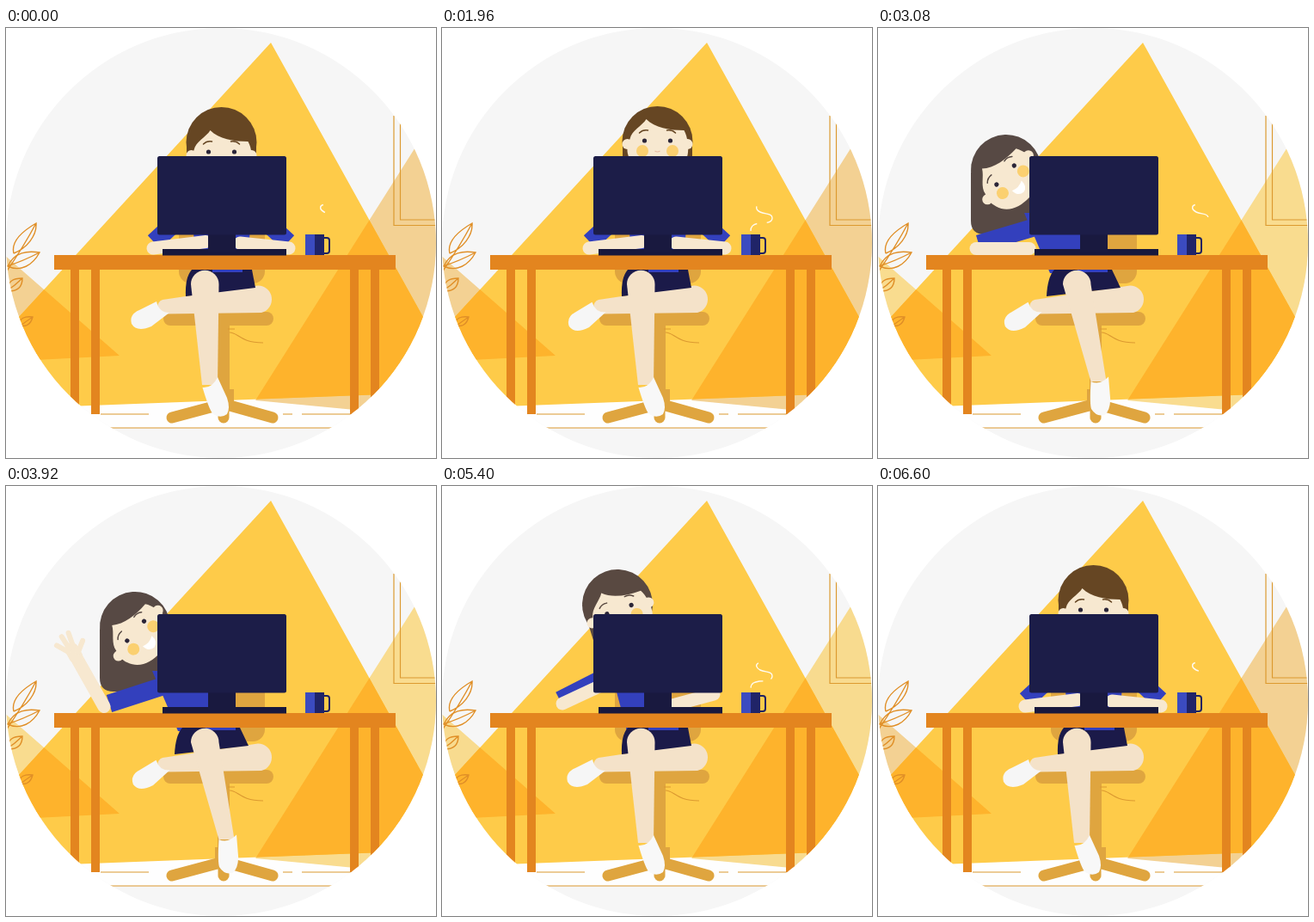
An HTML page for the animation above (6640 ms loop, 500x500 px).

```html
<!DOCTYPE html>
<html lang="en">
<head>
<meta charset="utf-8">
<title>At the desk</title>
<style>
  html, body { margin: 0; width: 100%; height: 100%; overflow: hidden; background: #fff; }
  svg { display: block; width: 100vw; height: 100vh; }
  .line { fill: none; stroke: #dc9a30; stroke-width: 1.2; }
  .plant { fill: none; stroke: #e08f27; stroke-width: 1.4; }
  .arm { fill: none; stroke: #f7e8d0; stroke-width: 15; stroke-linecap: round; }
  .sleeve { fill: none; stroke: #3340bd; stroke-width: 21; }
  .skin { fill: #f4e2c9; }
  .steam { fill: none; stroke: #fffaf0; stroke-width: 1.4; }
</style>
</head>
<body>
<svg viewBox="0 0 500 500">
  <defs>
    <clipPath id="disc"><circle cx="250" cy="250" r="250"/></clipPath>
    <path id="peak" d="M308 17L545 444L440 426L85 439.500L-20 443V374Z"/>
    <clipPath id="inPeak"><use href="#peak"/></clipPath>
    <path id="sideShapes" d="M520 69L290 433L520 455ZM-5 261L132 381L-60 391Z"/>
  </defs>
  <g clip-path="url(#disc)">
    <rect width="500" height="500" fill="#f6f6f6"/>
    <rect y="425" width="500" height="40" fill="#fefefe"/>
    <use id="faint" href="#sideShapes"/>
    <use href="#peak" fill="#fecb49"/>
    <use href="#sideShapes" fill="#feb32c" clip-path="url(#inPeak)"/>

    <g class="line">
      <path d="M451 102V229.500H500M458.500 109V223H500"/>
      <path d="M100 465H400M110 449H166M322 449H333M344 449H403"/>
    </g>
    <g class="plant">
      <path d="M0 284Q20 255 35 227M9 262C6 250 16 238 35 227C36 242 24 256 9 262"/>
      <path d="M1 277Q20 271 39 261M2 277C10 260 25 259 39 261C31 276 17 284 2 277"/>
      <path d="M0 306Q10 300 19 291M3 306C1 294 9 291 19 291C19 300 14 306 3 306"/>
      <path d="M12 350Q22 342 31 336M16 346C15 337 22 335 31 336C29 344 24 348 16 346"/>
    </g>

    <g fill="#dfa53f">
      <rect x="201" y="222" width="100" height="75" rx="14"/>
      <rect x="183" y="330" width="128" height="16" rx="8"/>
      <path d="M246 346H260V420H265V440H243V420H246Z"/>
      <path d="M193 453L253 437L310 453M253 437V453" fill="none" stroke="#dfa53f" stroke-width="13" stroke-linecap="round"/>
    </g>
    <path d="M260 354C270 354 272 366 299 366M258 350H266" class="line"/>

    <path id="backHair"/>
    <path id="torso" fill="#3340bd"/>
    <path id="sleeveR" class="sleeve"/>
    <path id="armR" class="arm"/>
    <g id="head">
      <circle id="cap" r="41"/>
      <g id="face">
        <g fill="#f7e8d0">
          <circle cx="-35" cy="4" r="6"/>
          <circle cx="35" cy="4" r="6"/>
          <path d="M-13-25C-3-15 14-12 31-12C35-5 37 9 35 17C30 32 16 38 0 38C-16 38-30 32-34 17C-36 10-35 4-32-2C-30-12-18-17-13-25Z"/>
        </g>
        <g fill="#fbd070">
          <circle cx="-17.5" cy="12" r="7"/>
          <circle cx="17.5" cy="12" r="7"/>
        </g>
        <g fill="#2b2538">
          <circle cx="-15" r="2.6"/>
          <circle cx="15" r="2.6"/>
        </g>
        <path id="brows" d="M-21-9Q-17-13-11-12M11-12Q17-13 21-9" fill="none" stroke-width="1.5" stroke-linecap="round"/>
        <path id="calm" d="M-3 12Q0 14 3 12" fill="none" stroke="#e8b9a0" stroke-width="1.2"/>
        <path id="smile" d="M-8 18Q0 22 8 18Q8 28 0 29Q-8 28-8 18Z" fill="#fff"/>
      </g>
    </g>
    <path id="sleeveL" class="sleeve"/>
    <path id="armL" class="arm"/>
    <g id="hand" fill="none" stroke="#f7e8d0" stroke-width="6" stroke-linecap="round">
      <path d="M0-4V-14" stroke-width="16"/>
      <path d="M-5-14L-13-27M-2-16L-3-33M3-16L6-33M5-8L16-17"/>
    </g>

    <g>
      <path class="skin" d="M293 299.5A16 16 0 0 1 297 331L184 332.5A8.5 8.5 0 0 1 182 316Z"/>
      <path id="skirt" fill="#1b1a49"/>
      <path id="shirtHem" fill="none" stroke="#3340bd" stroke-width="3"/>
      <path id="shin" class="skin"/>
      <path id="shoeL" fill="#f6f6f6" d="M175 318Q178 331 190 331L169 347Q152 354 146 344Q143 333 155 328Z"/>
      <path id="shoeR" fill="#f8f8f8" d="M-8.500 3Q3 4 9-9L20 15Q24 27 20 34Q12 40 3 33Q-1 28-8.500 3Z"/>
    </g>

    <path d="M56 264H453V281H434V449H424V281H410V449H400V281H109V449H99V281H85V449H75V281H56Z" fill="#e3851f"/>
    <rect x="182" y="257" width="144" height="7.500" fill="#18183d"/>
    <rect x="235" y="239" width="32" height="22" fill="#19193f"/>
    <rect x="176" y="149" width="150" height="91.500" rx="2.500" fill="#1c1d48"/>

    <rect x="367" y="244" width="9" height="18" rx="3" fill="none" stroke="#1e2261" stroke-width="2"/>
    <rect x="348" y="240" width="22" height="24" fill="#3b4bc0"/>
    <rect x="359" y="240" width="11" height="24" fill="#202468"/>
    <path id="steam1" class="steam"/>
    <path id="steam2" class="steam"/>
  </g>
</svg>
<script>
const LOOP = 6640, PUFF = LOOP / 2;
const el = Object.fromEntries([...document.querySelectorAll('[id]')].map(e => [e.id, e]));
const set = (id, name, value) => el[id].setAttribute(name, value);
const mix = (a, b, k) => a + (b - a) * k;
const smooth = k => k * k * (3 - 2 * k);
const line = (...points) => 'M' + points.join('L');
const tint = (a, b, k) => `rgb(${a.map((v, i) => Math.round(mix(v, b[i], k)))})`;

// head: x, y, turn; face: offset; hair and torso: corners; arms: shoulder, elbow (, hand)
const front = {
  head: [250.5, 133, 0], face: [0, 11],
  hair: [210, 128, 210, 200, 291, 200, 291, 128],
  torso: [215, 190, 286, 190, 281, 285, 221, 285],
  left: [200, 223, 172, 249], right: [300, 223, 328, 249, 272, 250],
  arm: [171, 256, -7], lean: [0]
};
const peek = { ...front, head: [250.5, 132, 0], face: [0, -1] };
const halfway = {
  head: [204, 138, -20], face: [0, 6],
  hair: [163, 138, 179, 205, 256, 200, 239, 125],
  torso: [190, 190, 250, 190, 275, 285, 215, 285],
  left: [190, 222, 137, 249], right: [280, 222, 315, 237, 264, 256],
  arm: [140, 253, -25], lean: [0.3]
};
const leaning = {
  head: [149, 165, -47], face: [-5, 3.5],
  hair: [108, 168, 108, 240, 185, 240, 184, 150],
  torso: [170, 215, 225, 215, 268, 285, 200, 285],
  left: [188, 230, 117, 251], right: [250, 215, 285, 228, 255, 230],
  arm: [114, 256.5, 0], lean: [1]
};
const waving = {
  ...leaning, head: [150, 164, -49], face: [-3, 3.5],
  hair: [109, 167, 109, 239, 185, 240, 184, 150], left: [188, 231, 120, 253]
};

const poses = [
  [0, front], [1450, front], [1800, peek], [2220, peek], [2520, halfway],
  [2900, leaning], [3200, leaning], [3600, waving], [4900, waving],
  [5400, halfway], [5780, front], [LOOP, front]
];
const wave = [
  [0, 0], [3180, 0], [3500, 1], [4880, 1], [5120, 0], [LOOP, 0]
];
const tap = [
  [0, 0], [1100, 1], [4200, 1], [5400, 0], [LOOP, 0]
];

// start and end of each puff along its path
const puff1 = [[950, 0, 0], [1200, 0, 26], [1480, 3, 48], [2080, 29, 61], [2500, 64, 64]];
const puff2 = [[1450, 0, 0], [1980, 0, 13], [2400, 5, 40], [3080, 34, 62], [3300, 48, 62], [3700, 64, 64]];

function span(keys, t) {
  if (t <= keys[0][0]) return [keys[0], keys[0], 0];
  const i = keys.findIndex(key => key[0] > t);
  if (i < 0) return [keys.at(-1), keys.at(-1), 0];
  const a = keys[i - 1], b = keys[i];
  return [a, b, (t - a[0]) / (b[0] - a[0])];
}

function track(keys, t) {
  const [a, b, k] = span(keys, t);
  return mix(a[1], b[1], smooth(k));
}

function poseAt(t) {
  const [a, b, k] = span(poses, t);
  const pose = {};
  for (const part in front)
    pose[part] = a[1][part].map((v, i) => mix(v, b[1][part][i], smooth(k)));
  return pose;
}

function drawSteam(id, keys, t) {
  const [a, b, k] = span(keys, t);
  const from = mix(a[1], b[1], k), to = mix(a[2], b[2], k);
  set(id, 'stroke-dasharray', `0 ${from} ${to - from} 200`);
}

function drawHead(p) {
  const [x, y, turn] = p.head, h = p.hair, lean = p.lean[0];
  const brown = tint([102, 70, 35], [87, 73, 68], Math.min(1, lean * 3));
  set('head', 'transform', `translate(${x} ${y}) rotate(${turn})`);
  set('face', 'transform', `translate(${p.face})`);
  set('cap', 'fill', brown);
  set('brows', 'stroke', brown);
  set('backHair', 'fill', brown);
  set('backHair', 'd', `M${h[0]} ${h[1]}L${h[2]} ${h[3] - 16}Q${h[2]} ${h[3]} ${h[2] + 16} ${h[3]}L${h[4]} ${h[5]}L${h[6]} ${h[7]}Z`);
  set('smile', 'opacity', lean);
  set('calm', 'opacity', 1 - lean);
}

function drawArms(p, t) {
  const l = p.left, r = p.right, up = track(wave, t);
  const sway = 9 * Math.sin((t - 4800) / 640 * 2 * Math.PI);
  const angle = mix(p.arm[2], -113 + sway, up), rad = angle * Math.PI / 180;
  const [ex, ey] = p.arm;
  const hx = ex + 62 * Math.cos(rad), hy = ey + 62 * Math.sin(rad);
  set('sleeveL', 'd', line(l.slice(0, 2), l.slice(2)));
  set('armL', 'd', line([ex, ey], [hx, hy]));
  set('sleeveR', 'd', line(r.slice(0, 2), r.slice(2, 4)));
  set('armR', 'd', line([r[2] + 1, r[3] + 7 * (1 - p.lean[0])], r.slice(4)));
  set('hand', 'transform', `translate(${hx} ${hy}) rotate(${angle + 90})`);
  set('hand', 'opacity', Math.min(1, up * 3));
  const o = p.torso;
  set('torso', 'd', line(o.slice(0, 2), o.slice(2, 4), o.slice(4, 6), o.slice(6)) + 'Z');
}

function drawLegs(lean, t) {
  const s = Math.max(0, (lean - 0.3) / 0.7);
  const ax = mix(237, 256.5, s), ay = mix(415, 411, s);
  const move = (x, y, dx) => [x + dx * s, y];
  const hip = [move(209, 312, -13), move(208, 290, -11), move(216, 281, -11)];
  set('skirt', 'd', line(move(286, 281, -14), move(290, 302, -8), hip[0]) + `Q${hip[1]} ${hip[2]}Z`);
  set('shirtHem', 'd', line(move(240, 282.5, -8), move(275, 282.5, -8)));
  set('shin', 'd', `M215 298A16 16 0 0 1 247.500 298L${ax + 9} ${ay}H${ax - 9}Z`);
  set('shoeR', 'transform', `translate(${ax} ${ay}) rotate(${20 * s})`);
  set('shoeL', 'transform', `rotate(${-5 * track(tap, t)} 182 324)`);
}

function draw(t) {
  const p = poseAt(t), lean = p.lean[0];
  drawHead(p);
  drawArms(p, t);
  drawLegs(lean, t);
  set('faint', 'fill', tint([243, 209, 147], [249, 220, 143], Math.min(1, lean * 3)));
  const u = t % PUFF;
  drawSteam('steam1', puff1, u);
  drawSteam('steam2', puff2, u < 500 ? u + PUFF : u);
}

for (const id of ['steam1', 'steam2']) {
  set(id, 'd', 'M359 236C359 229 363 228 369 227C378 227 384 226 384 221C384 215 376 217 370 214C364 211 364 206 371 205');
  set(id, 'pathLength', 64);
}

const start = performance.now();
function tick() {
  draw((performance.now() - start) % LOOP);
  requestAnimationFrame(tick);
}
tick();
</script>
</body>
</html>
```
